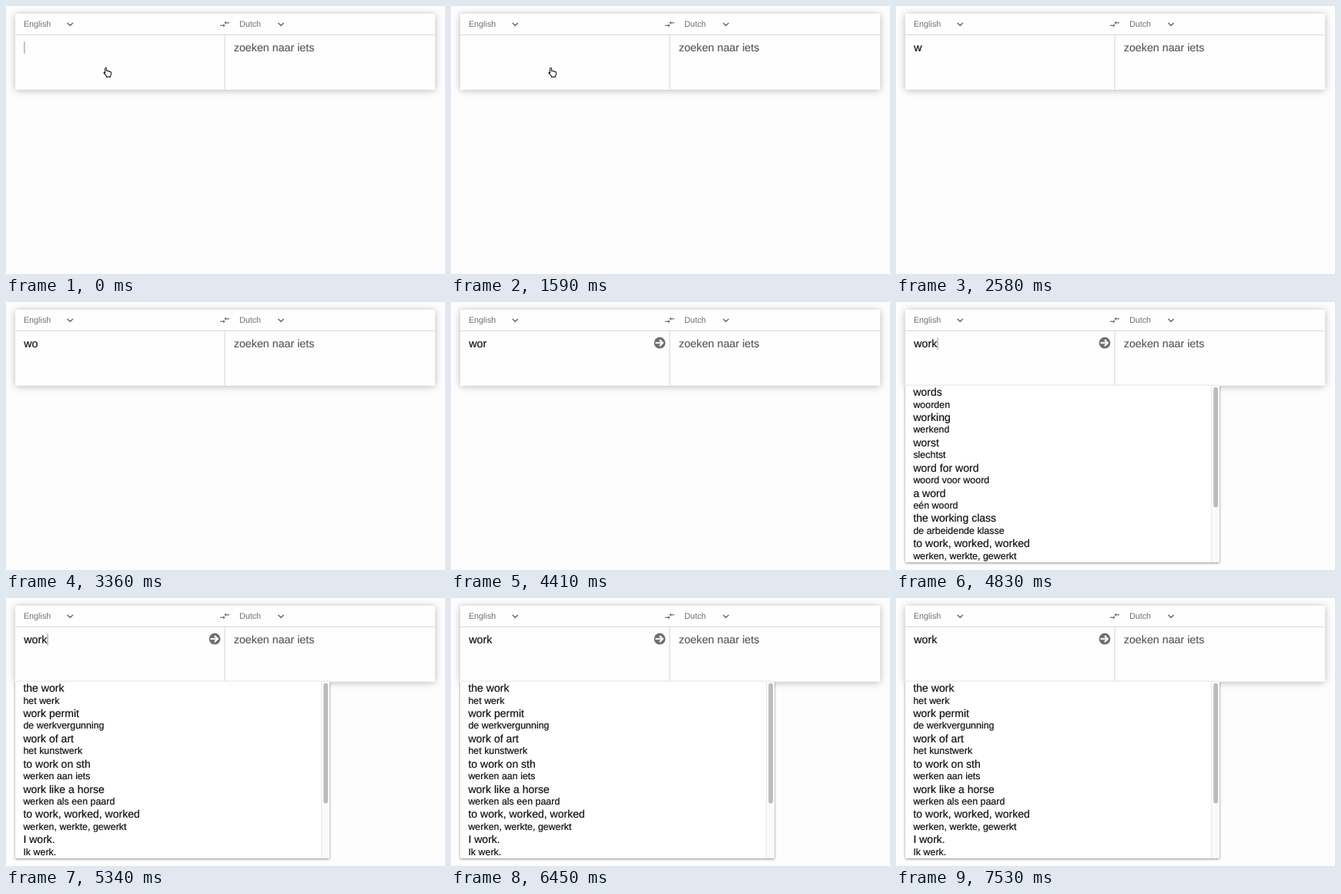
An HTML page for the animation above (8 s loop, 570 by 349 pixels).

```html
<!DOCTYPE html>
<html lang="en">
<head>
<meta charset="utf-8">
<title>Translate as you type</title>
<style>
html, body { margin: 0; width: 100%; height: 100%; overflow: hidden; background: #fdfdfd; }
svg { position: absolute; left: 0; top: 0; }
.card, .panel { position: absolute; box-sizing: border-box; background: #fefefe; }
.card { left: 11.5px; top: 10px; width: 545px; height: 98.5px; box-shadow: 0 1px 9px rgba(0,0,0,.27); }
.panel { left: 11.5px; top: 108.5px; width: 408.5px; height: 230.5px; background: #fff;
  box-shadow: 0 1px 3px rgba(0,0,0,.45); }
text { font-family: "Liberation Sans", Arial, sans-serif; text-rendering: geometricPrecision; white-space: pre; }
.lang { font-size: 10.8px; fill: #707070; }
.hint { font-size: 14.25px; fill: #555; stroke: #555; stroke-width: .12px; }
.query, .term, .sub { fill: #111; stroke: #111; stroke-width: .2px; }
.query { font-size: 14.3px; }
.term { font-size: 14.05px; }
.sub { font-size: 12.45px; }
.line { stroke: #e0e0e0; stroke-width: 1.4; }
.icon { fill: #707070; }
.chev { fill: none; stroke: #666; stroke-width: 1.35; }
.arrow { fill: none; stroke: #fff; stroke-width: 2.1; }

.w, .o, .r, .k, .hand, .shown, .first, .second, .caret { animation: 8s step-end infinite; }
.w { animation-name: w; }
.o { animation-name: o; }
.r { animation-name: r; }
.k { animation-name: k; }
.hand { animation-name: hand; }
.shown { animation-name: shown; }
.first { animation-name: first; }
.second { animation-name: second; }
.caret { animation-name: caret; }

@keyframes w { 0% { visibility: hidden } 25.125%, 100% { visibility: visible } }
@keyframes o { 0% { visibility: hidden } 35.25%, 100% { visibility: visible } }
@keyframes r { 0% { visibility: hidden } 48.375%, 100% { visibility: visible } }
@keyframes k { 0% { visibility: hidden } 60.375%, 100% { visibility: visible } }
@keyframes hand { 0% { visibility: visible } 25.5%, 100% { visibility: hidden } }
@keyframes shown { 0% { visibility: hidden } 60%, 100% { visibility: visible } }
@keyframes first { 0% { visibility: hidden } 60% { visibility: visible } 66.75%, 100% { visibility: hidden } }
@keyframes second { 0% { visibility: hidden } 66.75%, 100% { visibility: visible } }
@keyframes caret {
  0%, 13.5% { transform: none; opacity: 1 }
  6.75%, 19.875% { transform: none; opacity: 0 }
  25.125% { transform: translateX(10.3px); opacity: 1 }
  32.25% { transform: translateX(10.3px); opacity: 0 }
  35.25% { transform: translateX(18.6px); opacity: 1 }
  42% { transform: translateX(18.6px); opacity: 0 }
  48.375% { transform: translateX(23.1px); opacity: 1 }
  55.125% { transform: translateX(23.1px); opacity: 0 }
  60.375%, 73.875%, 87.75% { transform: translateX(30.2px); opacity: 1 }
  67.125%, 80.625%, 94.125%, 100% { transform: translateX(30.2px); opacity: 0 }
}
</style>
</head>
<body>
<div class="card"></div>
<div class="panel shown"></div>
<svg width="570" height="349" viewBox="0 0 570 349">
  <path class="line" d="M11.5 37.5H556.5M284 38V108.5"/>
  <text class="lang" x="22.9" y="27.3">English</text>
  <text class="lang" x="302.9" y="27.3">Dutch</text>
  <path class="chev" d="M79.7 21.9l3.6 3.6 3.6-3.6M353.4 21.9l3.6 3.6 3.6-3.6"/>
  <path class="icon" transform="translate(276.8 16.4) scale(.6)"
    d="M9 14H2v2h7v3l4-4-4-4zM15 13v-3h7V8h-7V5l-4 4z"/>

  <text class="hint" x="295.8" y="59.4">zoeken naar iets</text>
  <text class="query" x="23.2" y="58.8"><tspan class="w">w</tspan><tspan class="o">o</tspan><tspan class="r">r</tspan><tspan class="k">k</tspan></text>
  <rect class="caret" x="23.4" y="46.5" width="1" height="15.5" fill="#888"/>

  <g class="r">
    <circle class="icon" cx="271" cy="53.2" r="7.4"/>
    <path class="arrow" d="M265.4 53.2H274.6M270.9 49.2l4 4-4 4"/>
  </g>

  <path class="hand" fill="#fff" stroke="#222" stroke-width="1.1" stroke-linejoin="round"
    d="M128.6 87.4V81.6q0-1.1 1-1.1t1 1.1v3q1.8-.8 2 .5 1.7-.7 2 .6 1.8-.4 1.9 1v2.1q0 1.2-.9 2v1.6h-5.2v-1.2l-3.2-3.6q-.5-1.5.6-1.2z"/>

  <g id="lists"></g>
  <g class="shown">
    <rect x="409.5" y="109" width="10.5" height="230" fill="#fafafa"/>
    <path d="M409.7 109V339" stroke="#e8e8e8"/>
    <rect x="412.3" y="111" width="5.8" height="156.5" rx="2.9" fill="#bbb"/>
  </g>
</svg>
<script>
const NS = "http://www.w3.org/2000/svg";
const ROW = 32.93;
const lists = {
  first: [
    ["words", "woorden"],
    ["working", "werkend"],
    ["worst", "slechtst"],
    ["word for word", "woord voor woord"],
    ["a word", "eén woord"],
    ["the working class", "de arbeidende klasse"],
    ["to work, worked, worked", "werken, werkte, gewerkt"]
  ],
  second: [
    ["the work", "het werk"],
    ["work permit", "de werkvergunning"],
    ["work of art", "het kunstwerk"],
    ["to work on sth", "werken aan iets"],
    ["work like a horse", "werken als een paard"],
    ["to work, worked, worked", "werken, werkte, gewerkt"],
    ["I work.", "Ik werk."]
  ]
};

function add(parent, tag, attrs, content = "") {
  const el = document.createElementNS(NS, tag);
  for (const key in attrs) el.setAttribute(key, attrs[key]);
  el.textContent = content;
  return parent.appendChild(el);
}

const root = document.getElementById("lists");
for (const name in lists) {
  const group = add(root, "g", { class: name });
  lists[name].forEach(([term, sub], i) => {
    add(group, "text", { class: "term", x: 22.4, y: 121.8 + ROW * i }, term);
    add(group, "text", { class: "sub", x: 22.4, y: 137.5 + ROW * i }, sub);
  });
}
</script>
</body>
</html>
```
